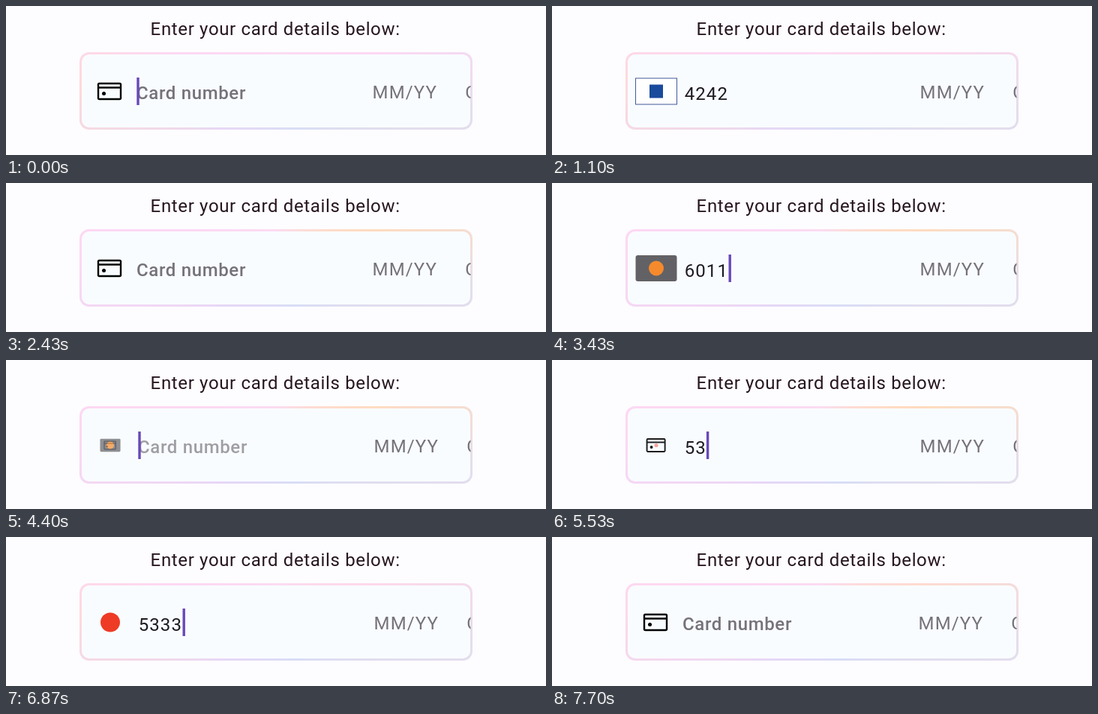
These frames come from a looping animation (720x200 px, 7.73 s). An HTML page:

```html
<!DOCTYPE html>
<html lang="en">
<head>
<meta charset="utf-8">
<title>Card details</title>
<style>
  html, body { margin: 0; width: 100%; height: 100%; overflow: hidden; background: #fdfcff; }
  #field {
    position: absolute; left: 98px; top: 62px; width: 524px; height: 104px;
    box-sizing: border-box; border: 3px solid transparent; border-radius: 13px;
  }
  svg { position: absolute; left: 0; top: 0; font: 24px Roboto, sans-serif; letter-spacing: 1.1px; }
  .hint { fill: #757279; }
  .label { letter-spacing: .65px; }
</style>
</head>
<body>
<div id="field"></div>
<svg width="720" height="200" viewBox="0 0 720 200">
  <clipPath id="inside"><rect x="101" y="65" width="518.5" height="98" rx="10"/></clipPath>
  <text class="label" x="192.6" y="39" fill="#27161f">Enter your card details below:</text>
  <g clip-path="url(#inside)">
    <g id="row">
      <text id="hint" class="hint label" x="174" y="124.5" font-weight="500">Card number</text>
      <text class="hint" x="488.6" y="124">MM/YY</text>
      <text class="hint" x="612.2" y="124">CVC</text>
      <text id="digits" x="174.7" y="126" fill="#1d1b20"></text>
      <rect id="cursor" y="96" width="3.4" height="37" fill="#6849b8"/>
    </g>
    <g id="generic" fill="none" stroke="#000" stroke-width="2.4">
      <rect x="-15" y="-10.5" width="30" height="21" rx="1.5"/>
      <path d="M-15-5H15"/>
      <circle cx="-7.5" cy="3" r="2.5" fill="#000" stroke="none"/>
    </g>
    <g class="brand">
      <rect x="-27.5" y="-17.5" width="55" height="35" fill="#fff" stroke="#43599a"/>
      <rect x="-9" y="-9" width="18" height="18" fill="#1a4a9c"/>
    </g>
    <g class="brand">
      <rect x="-27.5" y="-17.5" width="55" height="35" rx="3" fill="#626266"/>
      <circle r="10" fill="#f58a2c"/>
    </g>
    <g class="brand"><circle r="13" fill="#ee3b25"/></g>
  </g>
</svg>
<script>
const LOOP = 7730, CYCLE = LOOP / 3;
const FIRST_KEY = 217, KEY_GAP = 120, CLEAR = 1722;
const BLINK = 500, SWITCH = 200, HINT_FADE = 150;
// "known" is the digit count at which the card type is recognised
const cards = [
  { number: '4242', known: 1 },
  { number: '6011', known: 2 },
  { number: '5333', known: 2 },
];

const $ = id => document.getElementById(id);
const brands = document.querySelectorAll('.brand');
const clamp = v => Math.max(0, Math.min(1, v));
const keyTime = n => FIRST_KEY + (n - 1) * KEY_GAP;

// Amount present: rises at "from", falls at "to"
const presence = (t, from, to, span) => clamp((t - from) / span) - clamp((t - to) / span);

function place(icon, x, amount) {
  icon.setAttribute('transform', `translate(${x} 114.5) scale(${amount})`);
  icon.setAttribute('opacity', Math.sqrt(amount));
}

function paintBorder(t) {
  const k = 50 - 50 * Math.cos(t * Math.PI / 500);
  const mix = p => `color-mix(in srgb, #ffdcbc ${p}%, #fdd8f4)`;
  $('field').style.background = `linear-gradient(#f9fcff, #f9fcff) padding-box,
    conic-gradient(#fbdcf2, ${mix(k)} 70deg, #e4deec 95deg, #d8def6 150deg,
    #e6d8f6 235deg, ${mix(50 - k / 2)} 272deg, #fdd8f4 290deg, #fbdcf2) border-box`;
}

function draw(now) {
  const time = now % LOOP;
  const index = Math.floor(time / CYCLE);
  const t = time - index * CYCLE;
  const { number, known } = cards[index];

  const typed = t < CLEAR ? Math.max(0, Math.min(4, Math.floor((t - FIRST_KEY) / KEY_GAP) + 1)) : 0;
  const lastEdit = t >= CLEAR ? CLEAR : typed ? keyTime(typed) : 0;
  const shown = presence(t, keyTime(known), CLEAR, SWITCH);
  const shift = shown > 0 ? 2 : 0;

  $('row').setAttribute('transform', `translate(${shift} 0)`);
  $('hint').setAttribute('opacity', 1 - presence(t, FIRST_KEY, CLEAR, HINT_FADE));
  $('digits').textContent = number.slice(0, typed);
  $('cursor').setAttribute('x', 174.3 + typed * 14.8);
  $('cursor').setAttribute('opacity', Math.floor((t - lastEdit) / BLINK) % 2 ? 0 : 1);

  place($('generic'), shift ? 138.6 : 138, 1 - shown);
  brands.forEach((icon, i) => place(icon, 139, i === index ? shown : 0));
  paintBorder(time);
}

let start;
function tick(now) {
  start ??= now;
  draw(now - start);
  requestAnimationFrame(tick);
}
draw(0);
requestAnimationFrame(tick);
</script>
</body>
</html>
```
